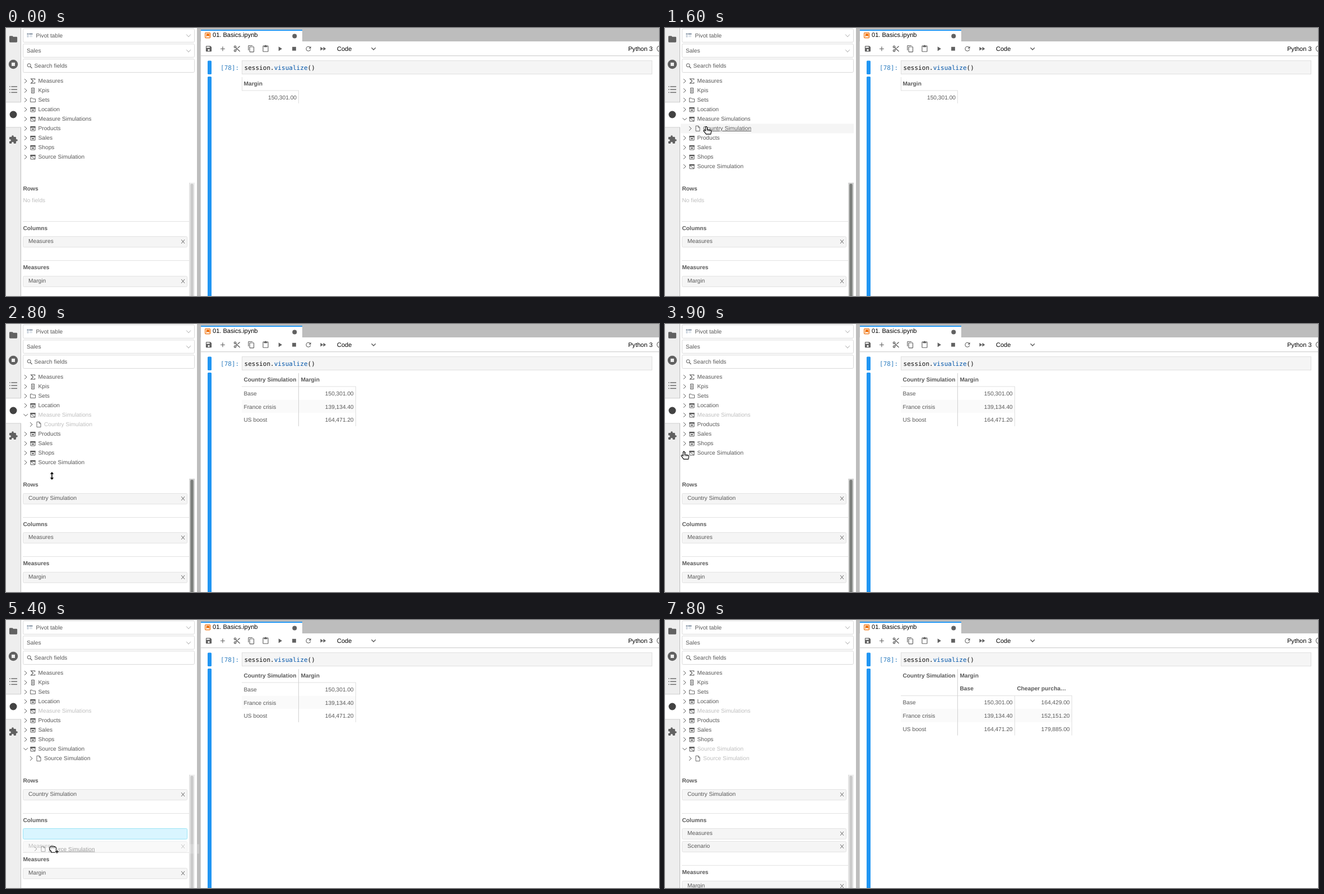
Write an HTML page that moves like this. It is 1166 px wide and 480 px high and loops after 8.2 s.

```html
<!DOCTYPE html>
<html lang="en">
<head>
<meta charset="utf-8">
<title>Pivot table simulations</title>
<style>
html, body { margin: 0; width: 100%; height: 100%; overflow: hidden; background: #fff; }
svg { display: block; width: 1166px; height: 480px; }
text { font: 10.2px "Liberation Sans", Arial, sans-serif; fill: #595959; white-space: pre; text-rendering: geometricPrecision; }
.b { font-weight: 700; }
.off { fill: #bfbfbf; }
.u { text-decoration: underline; }
.ui { font-size: 11.05px; fill: #000; }
.code { font: 11.05px "DejaVu Sans Mono", monospace; fill: #111; }
.end { text-anchor: end; }
.ln { fill: none; stroke: #595959; }
</style>
</head>
<body>
<svg viewBox="0 0 1166 480"><g id="base"></g><g id="live"></g></svg>
<script>
const LOOP = 8200, STEP = 100;
const INK = '#595959', ICON = '#616161', BLUE = '#2196f3';

// ---- drawing helpers ----
const rect = (x, y, w, h, fill, extra = '') =>
  `<rect x="${x}" y="${y}" width="${w}" height="${h}" fill="${fill}" ${extra}/>`;
const box = (x, y, w, h, fill, stroke, r = 2) =>
  rect(x + .5, y + .5, w - 1, h - 1, fill, `stroke="${stroke}" rx="${r}"`);
// y is the middle of the line; baselines sit on whole pixels
const text = (x, y, s, cls = '') =>
  `<text x="${x}" y="${Math.round(y + 3.3)}" class="${cls}">${s}</text>`;
const line = (d, extra = '') => `<path class="ln" d="${d}" ${extra}/>`;
const fill = (d, color = ICON) => `<path d="${d}" fill="${color}" fill-rule="evenodd"/>`;
const dot = (x, y, r, color = ICON) => `<circle cx="${x}" cy="${y}" r="${r}" fill="${color}"/>`;
const at = (x, y, body, k = 1) => `<g transform="translate(${x} ${y}) scale(${k})">${body}</g>`;
const icon24 = (x, y, size, body) => at(x - size / 2, y - size / 2, body, size / 24);

const chevron = (x, y, open) =>
  line(open ? `M${x - 3.5} ${y - 1.8}l3.7 3.8 3.7-3.8` : `M${x - 2} ${y - 3.8}l4 3.8-4 3.8`);
const cross = (x, y) => line(`M${x - 3} ${y - 3.5}l6 7m0-7l-6 7`, 'stroke-width=".9"');

const frame = line('M-4-3.5h8v7.5h-8z') + rect(-4.5, -4, 9, 2.6, INK);
const treeIcons = {
  sum: line('M3.6-2v-2h-7l4 4-4 4h7v-2', 'stroke-width="1.1"'),
  kpi: line('M-2.5-4.5h5v9h-5z') + [-2.2, 0, 2.2].map(y => dot(0, y, .9, INK)).join(''),
  set: line('M-4.5-3.5h3.4l1.2 1.5h4.4v5.5h-9z', 'stroke-width=".9"'),
  dim: frame + rect(-2, .2, 4, 2, INK),
  sim: frame + line('M-4-2l8 6'),
  page: line('M-3.5-4.7h4.4l2.6 2.6v6.8h-7zM.8-4.7v2.8h2.7', 'stroke-width=".9"')
};

// ---- still parts ----
function sidebar() {
  const list = [105, 110.2, 115.4].map(y => rect(6, y - .7, 1.6, 1.4, ICON) +
    rect(9.3, y - .7, 10.7, 1.4, ICON)).join('');
  return rect(0, 0, 27, 480, '#eee') + rect(26, 0, 1, 480, '#bdbdbd') +
    rect(0, 133, 27, 45, '#fff') + rect(0, 132.5, 27, .8, '#c6c6c6') + rect(0, 177.5, 27, .8, '#c6c6c6') +
    icon24(13, 20, 17, fill('M10 4H4a2 2 0 0 0-2 2v12a2 2 0 0 0 2 2h16a2 2 0 0 0 2-2V8a2 2 0 0 0-2-2h-8z')) +
    dot(13, 65, 8.2) + rect(10, 62, 6, 6, '#eee') + list +
    dot(13, 155, 6.5, '#424242') +
    icon24(13, 200, 17, fill('M20.5 11H19V7a2 2 0 0 0-2-2h-4V3.5a2.5 2.5 0 0 0-5 0V5H4a2 2 0 0 0-2 2v3.8h1.5a2.7 2.7 0 0 1 0 5.4H2V20a2 2 0 0 0 2 2h3.8v-1.5a2.7 2.7 0 0 1 5.4 0V22H17a2 2 0 0 0 2-2v-4h1.5a2.5 2.5 0 0 0 0-5z'));
}

function toolbar() {
  const scissors = '<g fill="none" stroke="#616161" stroke-width="2.4"><circle cx="6" cy="6" r="3"/>' +
    '<circle cx="6" cy="18" r="3"/><path d="M8 8l13 12.5M8 16l4-4m2-2l7-6.5"/></g>';
  const tools = [
    [362, fill('M17 3H5a2 2 0 0 0-2 2v14a2 2 0 0 0 2 2h14a2 2 0 0 0 2-2V7zm-5 16a3 3 0 1 1 0-6 3 3 0 0 1 0 6zm3-10H5V5h10z')],
    [387, fill('M19 13h-6v6h-2v-6H5v-2h6V5h2v6h6z')],
    [412.5, scissors],
    [438, fill('M16 1H4a2 2 0 0 0-2 2v14h2V3h12zm3 4H8a2 2 0 0 0-2 2v14a2 2 0 0 0 2 2h11a2 2 0 0 0 2-2V7a2 2 0 0 0-2-2zm0 16H8V7h11z')],
    [463.5, fill('M19 2h-4.2a3 3 0 0 0-5.6 0H5a2 2 0 0 0-2 2v16a2 2 0 0 0 2 2h14a2 2 0 0 0 2-2V4a2 2 0 0 0-2-2zm0 18H5V4h2v3h10V4h2z')],
    [489, fill('M8 5v14l11-7z')],
    [514.5, fill('M6 6h12v12H6z')],
    [540, fill('M17.6 6.4A8 8 0 1 0 19.7 14h-2.1A6 6 0 1 1 12 6c1.7 0 3.1.7 4.2 1.8L13 11h7V4z')],
    [566, fill('M4 18l8.5-6L4 6zm9-12v12l8.5-6z')]
  ];
  return rect(341, 0, 6, 480, '#bdbdbd') + rect(347, 0, 819, 24, '#bdbdbd') +
    rect(347, 24, 1, 456, '#d0d0d0') +
    rect(348, 4, 181, 21, '#fff') + rect(348, 3, 181, 2, BLUE) +
    rect(355.6, 8.6, 9, 9, '#fff', 'stroke="#ef6c00" stroke-width="1.2" rx="1"') +
    fill('M357.7 10.2h5.6v5.8l-2.8-2.2-2.8 2.2z', '#ef6c00') +
    text(369, 12.8, '01. Basics.ipynb', 'ui') + dot(515.3, 14.4, 4) +
    tools.map(([x, body]) => icon24(x, 37.2, 13.6, body)).join('') +
    text(591, 37.5, 'Code', 'ui') + line('M652.6 35.3l3.7 3.7 3.7-3.7', 'stroke-width="1.3"') +
    text(1111, 37.5, 'Python 3', 'ui') +
    '<circle cx="1167.5" cy="37" r="5" fill="none" stroke="#616161" stroke-width="1.1"/>' +
    rect(348, 49, 818, 1, '#d4d4d4') + rect(348, 50, 818, 1, '#f0f0f0');
}

function cell() {
  return rect(360, 58.5, 7, 24.5, BLUE, 'rx="1.5"') + rect(360, 87, 7, 400, BLUE, 'rx="1.5"') +
    box(421, 58, 733, 25, '#f5f5f5', '#e0e0e0', 0) +
    `<text x="383" y="75" class="code" style="fill:#307fc1">[78]:</text>` +
    `<text x="425.5" y="75" class="code">session.<tspan fill="#0055aa">visualize</tspan>()</text>`;
}

// ---- timeline: time, x, y, pointer shape ----
const track = [
  [200, 118, 9, 'hand'], [400, 98, 44, 'hand'], [500, 84, 66, 'arrow'], [700, 55, 118, 'arrow'],
  [900, 36, 158, 'hand'], [1000, 34, 164, 'hand'], [1200, 36, 166, 'hand'], [1500, 73, 179, 'hand'],
  [1600, 74, 180, 'hand'], [1700, 75, 188, 'grab'], [1900, 82, 275, 'grab'], [2200, 84, 312, 'grab'],
  [2400, 85, 313, 'grab'], [2600, 85, 312, 'hand'], [2700, 84, 296, 'arrow'], [2800, 82, 272, 'resize'],
  [2900, 70, 232, 'arrow'], [3200, 34, 165, 'hand'], [3500, 34, 165, 'hand'], [3900, 34, 232, 'hand'],
  [4100, 34, 232, 'hand'], [4400, 76, 247, 'hand'], [4500, 77, 256, 'grab'], [4800, 85, 333.5, 'grab'],
  [4900, 84.6, 369, 'grab'], [5400, 84, 410, 'grab'], [5500, 84, 411, 'grab'], [5700, 84, 411, 'hand'],
  [5800, 74, 421, 'arrow'], [6200, 17, 474, 'arrow'], [6300, 0, 500, '']
];
const drags = [
  { from: 1700, to: 2600, x: 74, y: 180, name: 'Country Simulation' },
  { from: 4500, to: 5700, x: 76, y: 247.5, name: 'Source Simulation' }
];

function pointer(t) {
  const i = track.findIndex(k => k[0] > t);
  if (i < 1) return { x: -99, y: -99, kind: '' };
  const [t0, x0, y0, kind] = track[i - 1], [t1, x1, y1] = track[i];
  const p = (t - t0) / (t1 - t0);
  return { x: x0 + (x1 - x0) * p, y: y0 + (y1 - y0) * p, kind };
}

const pen = 'fill="#fff" stroke="#000" stroke-width="1.1" stroke-linejoin="round"';
const pointers = {
  arrow: `<path d="M0 0v13.5l3.2-3 2.2 5 2.2-1-2.2-4.8h4.4z" fill="#000" stroke="#fff" stroke-width=".9"/>`,
  hand: `<path d="M-1.7-2.5q1.6-1.7 2.9 0v4.2l6.2 1.4q1.4.5 1.2 2l-.8 5H-.6L-5 4.2q0-2 2-1.3l1.3 1.4z" ${pen}/>` +
    '<path d="M1.2 1.7v3m2.4-2.4v2.6m2.3-2v2.4" stroke="#000" stroke-width=".8"/>',
  grab: `<path d="M-6-2.5q.2-2 2-1.4.8-1.7 2.6-.7 1.7-1 2.6.4 2-.7 2.6.8 1.7 0 1.7 1.6v3.5L4 6.2h-7.2V4.5l-3-3.2z" ${pen}/>` +
    '<path d="M-3.3-3.5v2.3M-.7-4v2.6M1.9-3.6v2.4" stroke="#000" stroke-width=".8"/>' +
    '<path d="M7 1.5v7M3.5 5h7" stroke="#fff" stroke-width="3"/><path d="M7 2v6M4 5h6" stroke="#000" stroke-width="1.3"/>',
  resize: '<path d="M0-7.5l3.8 4.5H1.1v6h2.7L0 7.5-3.8 3h2.7v-6h-2.7z" fill="#000" stroke="#fff" stroke-width=".7"/>'
};

// ---- live parts ----
function selects(m) {
  const edge = y => m.x > 30 && m.y >= y && m.y < y + 25 ? '#40a9ff' : '#d9d9d9';
  const field = y => box(30, y, 307, 25, '#fff', edge(y));
  const drop = y => line(`M322.2 ${y - 2}l3.8 4.4 3.8-4.4`, 'style="stroke:#aaa"');
  return field(1) + field(28) + field(55) + drop(13.5) + drop(40.8) +
    rect(37.5, 9.5, 3, 2.2, '#8795a5') + rect(41.3, 9.5, 6.2, 2.2, '#8795a5') +
    rect(37.5, 12.5, 3, 4.2, '#c9d2dc') + rect(42, 12.7, 5, 3.6, '#e1e6ec') +
    text(53.5, 13.6, 'Pivot table') + text(37, 41, 'Sales') +
    '<circle cx="41.2" cy="66.8" r="3" class="ln"/>' + line('M43.5 69l3 3.2', 'stroke-width="1.2"') +
    text(50.5, 67.7, 'Search fields');
}

const child = (y, name, cls = '') =>
  chevron(45, y) + at(58.5, y, treeIcons.page) + text(68, y, name, cls);
const rowBack = (y, extra) => rect(28, y - 8.5, 309, 17, '#f5f5f5', extra);

function tree(t, m) {
  const simOpen = t >= 1100 && t < 3400, srcOpen = t >= 4100;
  const simOff = t >= 2600 ? 'off' : '', srcOff = t >= 5700 ? 'off' : '';
  const rows = [
    ['sum', 'Measures'], ['kpi', 'Kpis'], ['set', 'Sets'], ['dim', 'Location'],
    ['sim', 'Measure Simulations', simOff, simOpen, 'Country Simulation'],
    ['dim', 'Products'], ['dim', 'Sales'], ['dim', 'Shops'],
    ['sim', 'Source Simulation', srcOff, srcOpen, 'Source Simulation']
  ];
  let y = 95, out = '';
  for (const [ic, name, off = '', open, sub] of rows) {
    out += chevron(35, y, open) + at(48, y, treeIcons[ic]) + text(57.5, y, name, off);
    y += 17;
    if (open) {
      const lit = !off && m.kind === 'hand' && m.x > 45 && Math.abs(m.y - y) < 8.5;
      out += lit ? rowBack(y) + child(y, sub, 'u') : child(y, sub, off);
      y += 17;
    }
  }
  return out;
}

const chip = (y, name, dim) => `<g opacity="${dim ? .5 : 1}">` +
  box(30, y - 9, 294, 20, '#f5f5f5', '#e3e3e3') + text(40, y, name) + cross(316, y + .5) + '</g>';
const slot = y => box(30, y - 9, 294, 20, '#d9f5ff', '#9be4f5');

function fields(t, m) {
  const drag = m.kind === 'grab';
  const overRows = drag && m.y > 292 && m.y < 346, overCols = drag && m.y > 372;
  const dy = t >= 5700 ? 23 : 0;
  const rule = y => rect(30, y, 297, 1, '#e3e3e3');
  let out = text(30.5, 288, 'Rows', 'b') + rule(346) + rule(416 + dy);
  if (overRows) out += slot(312);
  if (t >= 2600) out += chip(overRows ? 335 : 312, 'Country Simulation', overRows);
  else if (!overRows) out += text(30.5, 308.5, 'No fields', 'off');
  out += text(30.5, 358.5, 'Columns', 'b');
  if (overCols) out += slot(382);
  out += chip(overCols ? 405 : 382, 'Measures', overCols);
  if (dy) out += chip(405, 'Scenario');
  return out + text(30.5, 429 + dy, 'Measures', 'b') + chip(453 + dy, 'Margin');
}

function scrollbar(t) {
  const dark = (t >= 1100 && t < 1700) || (t >= 2600 && t < 4500) || (t >= 5700 && t < 7800);
  return rect(327, 277, 10, 203, dark ? '#cfcfcf' : '#ededed') + rect(327, 277, 1, 203, '#dcdcdc') +
    rect(329.3, 279, 5.4, 210, dark ? '#7c7f7c' : '#cbcbcb', 'rx="2"');
}

const cases = [
  ['Base', '150,301.00', '164,429.00'],
  ['France crisis', '139,134.40', '152,151.20'],
  ['US boost', '164,471.20', '179,885.00']
];

function table(t) {
  const G = '#e0e0e0';
  if (t < 2700) {
    return text(424.5, 99.2, 'Margin', 'b') + rect(421, 88, 1, 24, G) + rect(421, 111.5, 102, 1, G) +
      rect(522, 112, 1, 23, G) + text(519, 124.5, cases[0][1], 'end');
  }
  const wide = t >= 5900, top = wide ? 135.6 : 112, right = wide ? 727 : 625, H = 23.7;
  let out = rect(421, top + H, right - 421, H, '#fafafa') +
    text(424.5, 99.2, 'Country Simulation', 'b') + text(526.5, 99.2, 'Margin', 'b');
  if (wide) out += text(526.5, 123, 'Base', 'b') + text(628.5, 123, 'Cheaper purcha…', 'b');
  cases.forEach(([name, a, b], i) => {
    const y = top + 12.5 + i * H;
    out += text(424.5, y, name) + text(620.8, y, a, 'end') + (wide ? text(722.8, y, b, 'end') : '');
  });
  out += rect(421, top - .5, right - 421, 1, G) + rect(522, 88, 1, top + 3 * H - 88, '#d2d2d2') +
    rect(624, top, 1, 3 * H, G);
  return out + (wide ? rect(726, top, 1, 3 * H, G) : '');
}

function ghost(t, m) {
  const d = drags.find(d => t >= d.from && t < d.to);
  if (!d) return '';
  const row = rowBack(d.y, 'opacity=".25"') + `<g opacity=".55">${child(d.y, d.name, 'u')}</g>`;
  return at(m.x - d.x, m.y - d.y, row);
}

const base = document.getElementById('base'), live = document.getElementById('live');
base.innerHTML = sidebar() + toolbar() + cell();

function draw(t) {
  const m = pointer(t);
  live.innerHTML = selects(m) + tree(t, m) + fields(t, m) + scrollbar(t) + table(t) + ghost(t, m) +
    (m.kind ? at(m.x, m.y, pointers[m.kind]) : '');
}

const start = performance.now();
let last = -1;
function tick() {
  const t = Math.floor((performance.now() - start) % LOOP / STEP) * STEP;
  if (t !== last) draw(last = t);
  requestAnimationFrame(tick);
}
tick();
</script>
</body>
</html>
```
